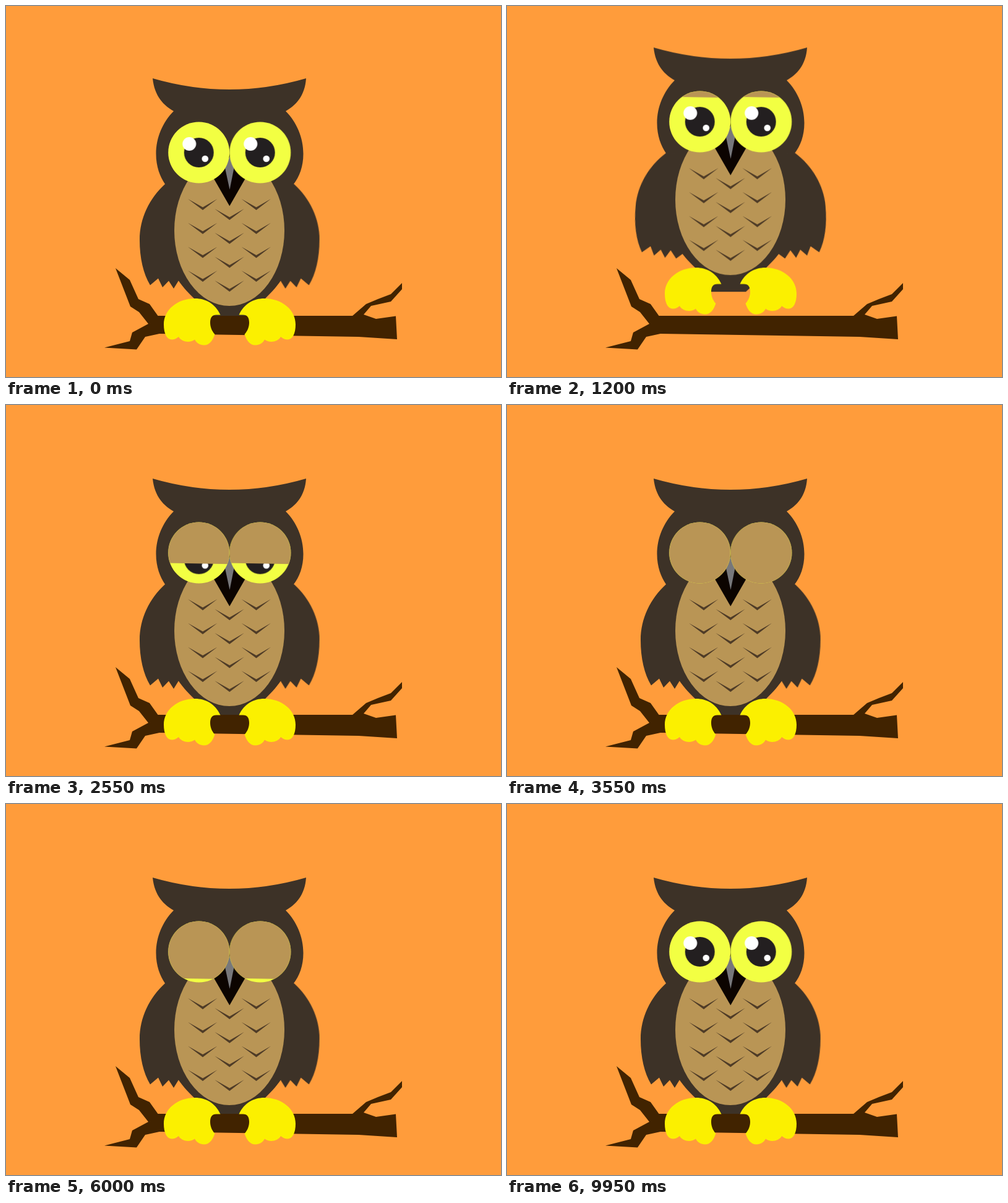
Write an HTML page without scripts that moves like this. It is 800 px wide and 600 px high and loops after 10000 ms.

```html
<!DOCTYPE html>
<html lang="en">
<head>
<meta charset="utf-8">
<title>Owl on a branch</title>
<style>
html, body { margin: 0; width: 100%; height: 100%; overflow: hidden; background: #ff9c3b; }
svg { display: block; width: 800px; height: 600px; }

.hop, .branch, .rise, .wing, .lid, .look { animation: 10s linear infinite; }
.hop { animation-name: hop; }
.branch { animation-name: sway; }
.rise { animation-name: rise; }
.wing { animation-name: flap; transform-origin: 262px 290px; }
.lid { animation-name: blink; }
.look { animation-name: droop; }

.dark { fill: #3d3227; }
.tan { fill: #b99555; }
.wood { fill: #412300; }
.mark { fill: #4f3c27; }
.iris { fill: #f2ff43; }
.pupil { fill: #231f20; }
.foot { fill: #fbf000; }

/* crouch, leap, land and settle */
@keyframes hop {
  0% { transform: translateY(-2px); animation-timing-function: ease-in-out; }
  1.3% { transform: translateY(23px); animation-timing-function: ease-in; }
  2.5% { transform: translateY(0); animation-timing-function: cubic-bezier(.333, .667, .667, 1); }
  8.55% { transform: translateY(-77px); animation-timing-function: cubic-bezier(.333, 0, .667, .333); }
  14.6% { transform: translateY(0); animation-timing-function: ease-out; }
  16.4% { transform: translateY(34px); animation-timing-function: ease-in-out; }
  18.4% { transform: translateY(-9px); animation-timing-function: ease-in-out; }
  20.2% { transform: translateY(6px); animation-timing-function: ease-in-out; }
  22% { transform: translateY(-3px); animation-timing-function: ease-in-out; }
  23.8% { transform: translateY(2px); animation-timing-function: ease-in-out; }
  25.5%, 100% { transform: translateY(0); }
}
@keyframes sway {
  0% { transform: translateY(0); animation-timing-function: ease-in-out; }
  1.3% { transform: translateY(23px); animation-timing-function: ease-in; }
  2.5% { transform: translateY(0); animation-timing-function: ease-out; }
  4% { transform: translateY(-10px); animation-timing-function: ease-in-out; }
  6% { transform: translateY(5px); animation-timing-function: ease-in-out; }
  8% { transform: translateY(-2px); animation-timing-function: ease-in-out; }
  10%, 14.6% { transform: translateY(0); animation-timing-function: ease-out; }
  16.4% { transform: translateY(34px); animation-timing-function: ease-in-out; }
  18.4% { transform: translateY(-9px); animation-timing-function: ease-in-out; }
  20.2% { transform: translateY(6px); animation-timing-function: ease-in-out; }
  22% { transform: translateY(-3px); animation-timing-function: ease-in-out; }
  23.8% { transform: translateY(2px); animation-timing-function: ease-in-out; }
  25.5%, 100% { transform: translateY(0); }
}
/* each part stretches up by its own amount */
@keyframes rise {
  0%, 41% { transform: translateY(0); animation-timing-function: cubic-bezier(.16, 1, .3, 1); }
  54%, 58% { transform: translateY(var(--up)); animation-timing-function: ease-in-out; }
  59.9%, 61.5% { transform: translateY(0); animation-timing-function: cubic-bezier(.16, 1, .3, 1); }
  74%, 76.5% { transform: translateY(var(--up)); animation-timing-function: ease-in-out; }
  78.5%, 80.5% { transform: translateY(0); animation-timing-function: cubic-bezier(.16, 1, .3, 1); }
  86%, 86.5% { transform: translateY(var(--up)); animation-timing-function: ease-in-out; }
  88.8%, 100% { transform: translateY(0); }
}
@keyframes flap {
  0%, 2.5% { transform: rotate(0); animation-timing-function: ease-out; }
  4.5%, 12.5% { transform: rotate(5.3deg); animation-timing-function: ease-in-out; }
  15.5%, 36% { transform: rotate(0); animation-timing-function: ease-in-out; }
  38.5% { transform: rotate(5deg); animation-timing-function: ease-in-out; }
  41.5%, 100% { transform: rotate(0); }
}
@keyframes blink {
  0%, 9.6% { transform: translateY(0); }
  12% { transform: translateY(10px); }
  25.5% { transform: translateY(67px); }
  33.5%, 41% { transform: translateY(102px); animation-timing-function: ease-out; }
  45%, 58% { transform: translateY(0); }
  60% { transform: translateY(93px); }
  60.6%, 61.2% { transform: translateY(102px); animation-timing-function: ease-out; }
  65%, 76.5% { transform: translateY(0); }
  78.2% { transform: translateY(102px); }
  80% { transform: translateY(10px); animation-timing-function: ease-out; }
  81.5%, 86.5% { transform: translateY(0); }
  88.7%, 89.2% { transform: translateY(102px); }
  92% { transform: translateY(20px); animation-timing-function: ease-out; }
  95% { transform: translateY(3px); }
  97% { transform: translateY(1.5px); }
  99.5%, 100% { transform: translateY(0); }
}
@keyframes droop {
  0%, 15% { transform: translateY(0); animation-timing-function: ease-in-out; }
  25%, 41% { transform: translateY(10.5px); animation-timing-function: ease-out; }
  44%, 100% { transform: translateY(0); }
}
</style>
</head>
<body>
<svg viewBox="0 0 800 600">
  <defs>
    <path id="wing" d="M257 290C232 313 216 345 216 380C216 410 222 435 233 453.500L246 442.500L253 457L263 446.500L271 459L279 446L289 458.500L310 440V290Z"/>
    <path id="foot" d="M346.500 501.500C338 483 322 475 306 475C276 475 255 494 255 517C255 532 260 541.500 268 541.500C272 541.500 275 540 279 537C284 546 298 547 305 541.500C308 547 313 550.500 320 550.500C329 550.500 334 543 337.500 533C332 527 330 520 330 514C330 506 333 501.500 340 501.500Z"/>
    <path id="vee" d="M-24 -18L0 -4.500L23.500 -18L0 0Z"/>
    <g id="side">
      <use href="#vee"/><use href="#vee" y="38.700"/><use href="#vee" y="77.400"/><use href="#vee" y="116.100"/>
    </g>
    <g id="ball">
      <circle class="pupil" r="24"/>
      <circle cx="-15.500" cy="-14" r="11" fill="#fff"/>
      <circle cx="10" cy="10" r="5.300" fill="#fff"/>
    </g>
    <clipPath id="round"><circle r="49.500"/></clipPath>
    <path id="lid" d="M-52 -160H52V-48.700L-52 -50.500Z"/>
  </defs>

  <g class="hop">
    <g class="rise" style="--up:-10.600px">
      <path class="dark" d="M237 119Q361.300 155 485 119C483 148 468 163 452 172C470 190 480.500 215 480.500 241C480.500 262 474 278 465 290V400C458 430 440 455 420 474L396 500L392.500 508L386 514H330V500L303 474C283 455 265 430 257 400V290C249 278 242.500 262 242.500 241C242.500 215 253 190 271 172C255 163 240 148 237 119Z"/>
    </g>
    <g class="rise" style="--up:-3.200px">
      <g class="wing"><use class="dark" href="#wing"/></g>
      <g transform="translate(722.600) scale(-1 1)">
        <g class="wing"><use class="dark" href="#wing"/></g>
      </g>
    </g>
    <g class="rise" style="--up:-10.600px">
      <ellipse class="tan" cx="361" cy="365" rx="89" ry="122"/>
      <g class="mark">
        <use href="#side" x="318" y="332"/>
        <use href="#side" x="361.300" y="348"/>
        <use href="#side" x="404.500" y="332"/>
      </g>
      <g class="rise" style="--up:-10.600px">
        <path fill="#0c0400" d="M361.300 242L334 278L361.300 325.500L388.500 278Z"/>
        <path fill="#77777a" d="M361.300 245L354 264L361.500 299L368.500 264Z"/>
        <g transform="translate(311.700 239)">
          <circle class="iris" r="49.500"/>
          <g class="look"><use href="#ball"/></g>
          <g clip-path="url(#round)"><g class="lid"><use class="tan" href="#lid"/></g></g>
        </g>
        <g transform="translate(410.700 239)">
          <circle class="iris" r="49.500"/>
          <g class="look"><use href="#ball"/></g>
          <g clip-path="url(#round)"><g class="lid"><use class="tan" href="#lid"/></g></g>
        </g>
      </g>
    </g>
  </g>

  <path class="branch wood" d="M177 424L200 443L214 474L232 482L245.500 501H560L582 482L601 474L622 466L640 448V458L622 478L590 485L578 499L598 506L630 501.500L632 539L570 535L248 530L225 535L211 555.500L159 552.500L200 542L204 528L230 514L215 495L201 486Z"/>

  <g class="hop foot">
    <use href="#foot"/>
    <use href="#foot" transform="translate(723) scale(-1 1)"/>
  </g>
</svg>
</body>
</html>
```
